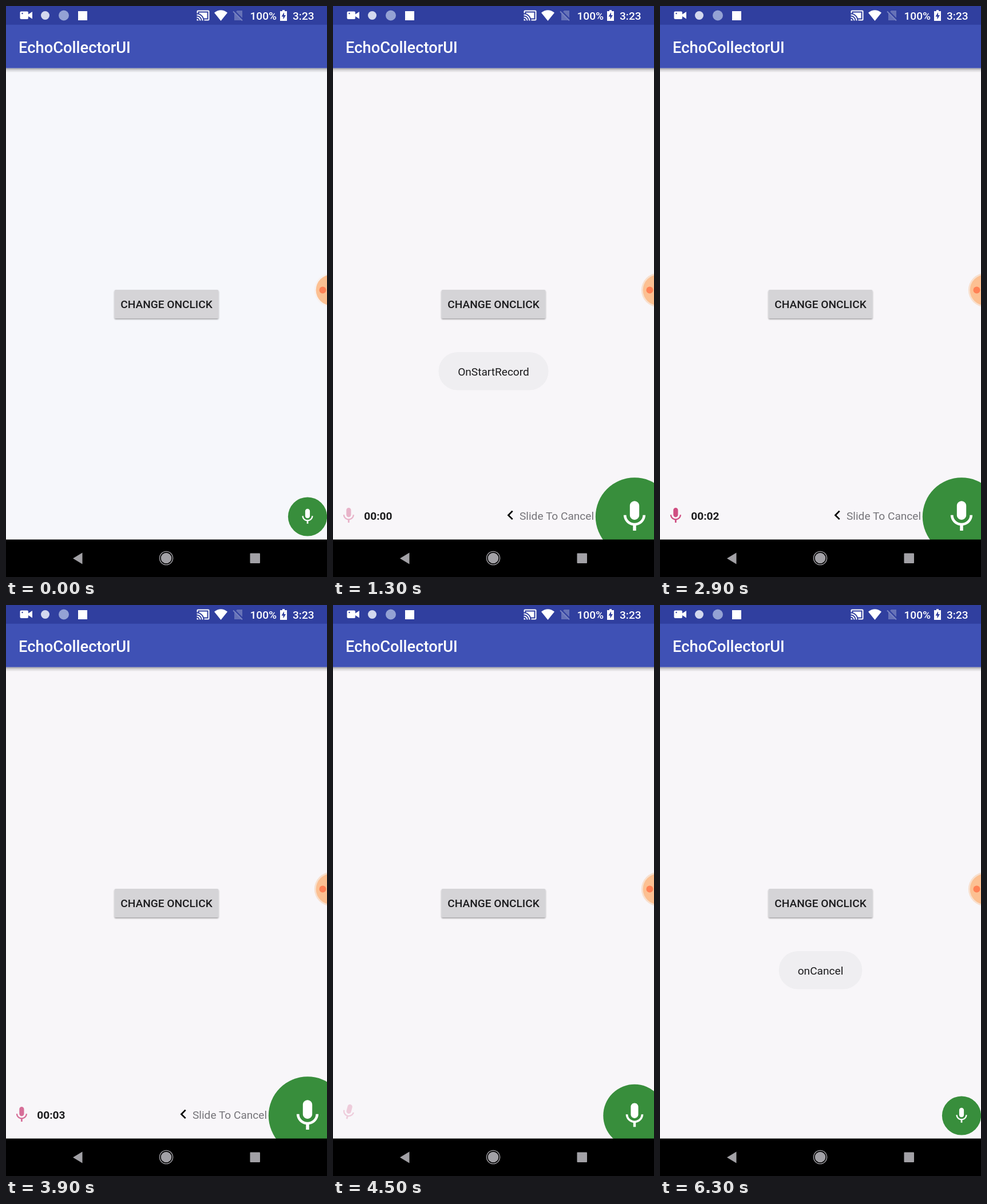
Write an HTML page that moves like this. It is 561 by 998 pixels and loops after 6500 ms.

```html
<!DOCTYPE html>
<html lang="en">
<head>
<meta charset="utf-8">
<title>Recorder demo</title>
<style>
  html, body { margin: 0; width: 100%; height: 100%; overflow: hidden; background: #f8f6f9; }
  svg { display: block; width: 561px; height: 998px; }
  text { font: 400 19.1px Roboto, "Open Sans", sans-serif; fill: #1b1b1d; }
  .medium { font-weight: 500; }
  .bold { font-weight: 700; }
  .white { fill: #fff; }
  .mid { text-anchor: middle; }
  .title { font-size: 27.3px; }
  .toast rect { fill: #efeef1; }
  .hint { fill: #757479; }
</style>
</head>
<body>
<svg viewBox="0 0 561 998">
  <defs>
    <path id="mic" d="M12 14c1.66 0 2.99-1.34 2.99-3L15 5c0-1.66-1.34-3-3-3S9 3.34 9 5v6c0 1.66 1.34 3 3 3zm5.3-3c0 3-2.54 5.1-5.3 5.1S6.7 14 6.7 11H5c0 3.41 2.72 6.23 6 6.72V21h2v-3.28c3.28-.48 6-3.3 6-6.72h-1.7z"/>
    <linearGradient id="shade" x2="0" y2="1">
      <stop offset="0" stop-opacity=".36"/>
      <stop offset=".4" stop-opacity=".14"/>
      <stop offset="1" stop-opacity="0"/>
    </linearGradient>
    <filter id="lift" x="-5%" y="-10%" width="110%" height="130%">
      <feDropShadow dx="0" dy="1.6" stdDeviation="1.3" flood-opacity=".36"/>
    </filter>
  </defs>

  <rect id="page" width="561" height="998"/>

  <!-- app bar -->
  <rect y="108.6" width="561" height="8" fill="url(#shade)"/>
  <rect width="561" height="108.6" fill="#3f51b5"/>
  <text class="title medium white" x="22" y="81.5">EchoCollectorUI</text>

  <!-- status bar -->
  <rect width="561" height="32.7" fill="#303f9f"/>
  <g fill="#fff">
    <rect x="24.5" y="9.5" width="14.5" height="13.5" rx="2"/>
    <path d="M39 14.5l7-4.5v12.5l-7-4.5z"/>
    <circle cx="28.5" cy="13" r="1.2" fill="#303f9f"/>
    <circle cx="68.5" cy="16.5" r="7.5" fill="#d3d8ee"/>
    <circle cx="101" cy="16.5" r="9" fill="#94a2d4"/>
    <rect x="126" y="9" width="16" height="16"/>
    <path transform="translate(332.5 4.5)" d="M1 18v3h3c0-1.66-1.34-3-3-3zm0-4v2c2.76 0 5 2.24 5 5h2c0-3.87-3.13-7-7-7zm18-7H5v1.63c3.96 1.28 7.09 4.41 8.37 8.37H19V7zM1 10v2c4.97 0 9 4.03 9 9h2c0-6.08-4.93-11-11-11zm20-7H3c-1.1 0-2 .9-2 2v3h2V5h18v14h-7v2h7c1.1 0 2-.9 2-2V5c0-1.1-.9-2-2-2z"/>
    <path d="M375.5 26L364 11.7Q375.5 3 387 11.7z"/>
    <path d="M404 8h9v17h-14V13z" fill="#6672b7"/>
    <path d="M398.5 8l17 17" stroke="#303f9f" stroke-width="2.4"/>
    <path d="M397 9.5l16 16" stroke="#7884c2" stroke-width="1.8"/>
    <path d="M483 7h4v2h4v17h-12V9h4z"/>
    <path d="M486 11l-4.5 7.5h3v5l4.5-7.5h-3z" fill="#303f9f"/>
  </g>
  <text class="medium white" x="426.5" y="24">100%</text>
  <text class="medium white" x="501" y="24">3:23</text>

  <!-- page button -->
  <rect x="189.5" y="496" width="182" height="50" rx="2.5" fill="#d5d4d7" filter="url(#lift)"/>
  <text class="medium mid" x="280.5" y="528.3">CHANGE ONCLICK</text>

  <!-- floating bubble -->
  <circle id="halo" cx="568.5" cy="496.5" r="29.7" fill="#f8e0cf"/>
  <circle cx="568.5" cy="496.5" r="26.8" fill="#fcc092"/>
  <circle cx="553.5" cy="496.5" r="6" fill="#ff8155"/>

  <g id="startToast" class="toast">
    <rect x="184.5" y="605" width="192" height="66.5" rx="33"/>
    <text class="mid" x="280.5" y="646.3">OnStartRecord</text>
  </g>
  <g id="cancelToast" class="toast">
    <rect x="207.7" y="605" width="145.6" height="66.5" rx="33"/>
    <text class="mid" x="280.5" y="646.3">onCancel</text>
  </g>

  <!-- recording row -->
  <use id="blink" href="#mic" fill="#c2185b"/>
  <g id="basket">
    <path d="M6 19c0 1.1.9 2 2 2h8c1.1 0 2-.9 2-2V7H6z"/>
    <path id="lid" d="M19 4h-3.5l-1-1h-5l-1 1H5v2h14z"/>
  </g>
  <text id="timer" class="bold" x="54.3" y="897.6"></text>
  <g id="slide">
    <path transform="translate(293.6 873.5) scale(1.365)" d="M15.41 16.59L10.83 12l4.58-4.59L14 6l-6 6 6 6z"/>
    <text class="hint" x="326" y="897.6">Slide To Cancel</text>
  </g>
  <g id="record">
    <circle r="34.1" fill="#388e3c"/>
    <use href="#mic" fill="#fff" transform="scale(1.365) translate(-12 -12)"/>
  </g>

  <!-- navigation bar -->
  <rect y="932.5" width="561" height="65.5"/>
  <g fill="#a2a1a6">
    <path d="M117 965.5l16.5-10v20z"/>
    <circle cx="280" cy="965" r="9.3"/>
    <circle cx="280" cy="965" r="11.6" fill="none" stroke="#a2a1a6" stroke-width="1.4"/>
    <rect x="426.5" y="956.5" width="17.5" height="17.5" rx="1"/>
  </g>
</svg>

<script>
const LOOP = 6500, STEP = 100;
const PRESS = 450, DRAG = 4000, CANCEL = 4435;
const ICON = 1.365;

const $ = id => document.getElementById(id);
const clamp = v => Math.min(1, Math.max(0, v));
const part = (t, from, to) => clamp((t - from) / (to - from));
const wave = p => (1 - Math.cos(Math.PI * p)) / 2;
const ease = (t, from, to) => wave(part(t, from, to));
const move = (id, value) => $(id).setAttribute('transform', value);
const fade = (id, value) => { $(id).style.opacity = value; };

function drawButton(t) {
  const held = t >= PRESS && t < CANCEL;
  const dx = held ? -190 * ease(t, DRAG, CANCEL) : 0;
  const scale = 1 + ease(t, PRESS, PRESS + 150) - ease(t, CANCEL, CANCEL + 150);
  move('record', `translate(${527 + dx} 892.5) scale(${scale})`);
  move('slide', `translate(${dx} 0)`);
  fade('slide', +held);
  fade('timer', +held);
  const secs = Math.max(0, Math.floor((t - 500) / 1000));
  $('timer').textContent = `00:0${secs}`;
}

// The mic keeps blinking while it is tossed up and drops into the basket.
function drawMic(t) {
  const phase = 0.15 + (t - 600) / 1052;
  const shown = t >= PRESS && t < 5800;
  fade('blink', shown ? wave(2 * phase) : 0);
  const toss = ease(t, CANCEL, CANCEL + 500);
  const y = 890 - 108 * toss + 103 * ease(t, 5000, 5800);
  move('blink', `translate(27.4 ${y}) rotate(${360 * toss})
    scale(${ICON * (1 + 0.25 * toss)}) translate(-12 -11.5)`);
}

function drawBasket(t) {
  const up = ease(t, 5270, 5520) - ease(t, 5780, 6000);
  move('basket', `translate(11 ${929 - 56 * up}) scale(${ICON})`);
  const open = ease(t, 5520, 5620) - ease(t, 5720, 5800);
  move('lid', `rotate(${-35 * open} 5 6)`);
}

function draw(t) {
  $('page').setAttribute('fill', t < 100 ? '#f6f7fb' : '#f8f6f9');
  fade('halo', t < 100 ? 0.3 : 1);
  fade('startToast', ease(t, 540, 720) - ease(t, 2560, 2860));
  fade('cancelToast', ease(t, 4540, 4720));
  drawButton(t);
  drawMic(t);
  drawBasket(t);
}

const start = performance.now();
function tick() {
  const t = (performance.now() - start) % LOOP;
  draw(Math.floor(t / STEP) * STEP);
  requestAnimationFrame(tick);
}
tick();
</script>
</body>
</html>
```
